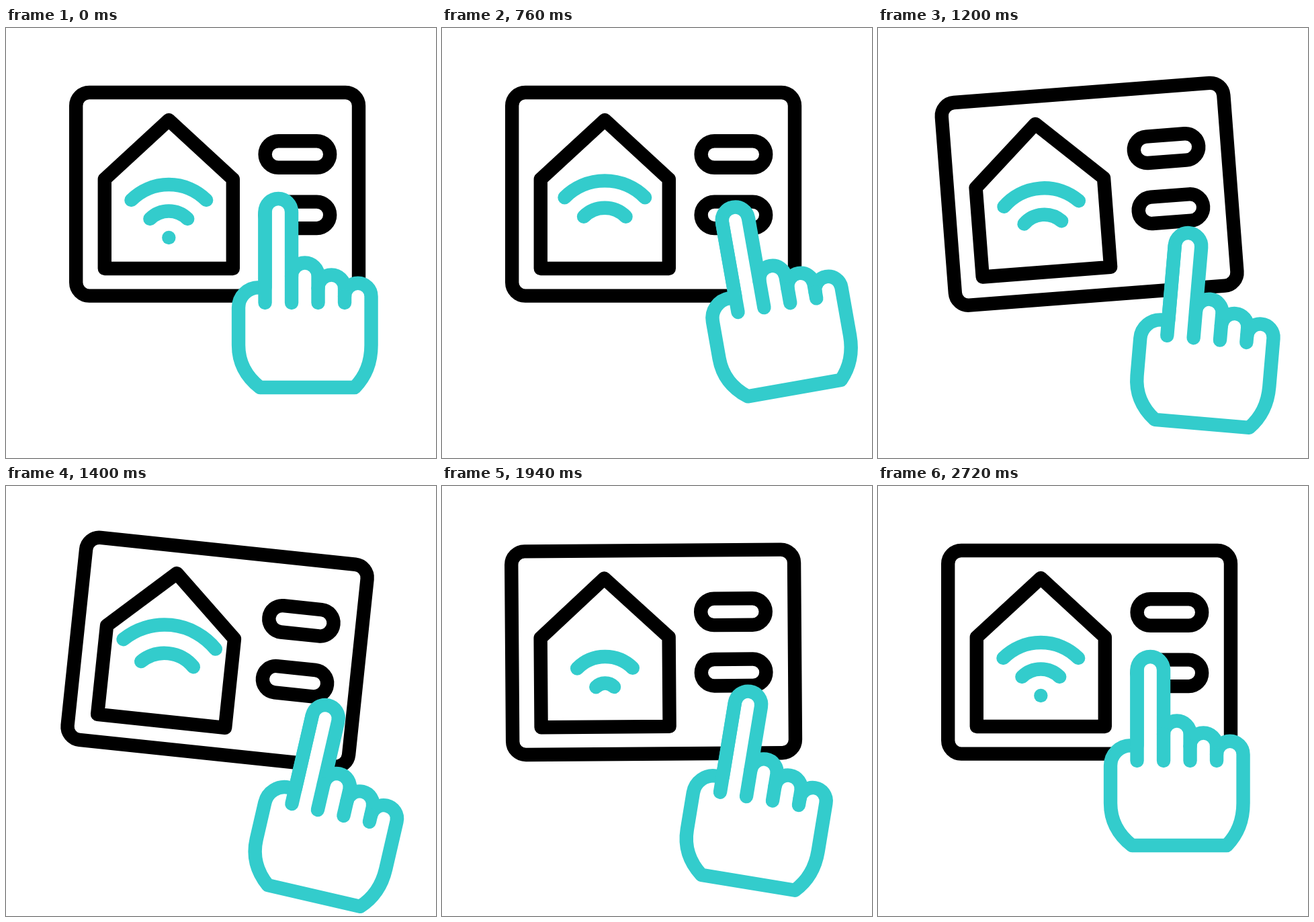
Write an HTML page with a canvas that moves like this. It is 640 px wide and 640 px high and loops after 3 s.

```html
<!DOCTYPE html>
<html lang="en">
<head>
<meta charset="utf-8">
<title>Smart home panel</title>
<style>
  html, body { margin: 0; width: 100%; height: 100%; overflow: hidden; background: #fff; }
  canvas { display: block; width: 100vmin; height: 100vmin; }
</style>
</head>
<body>
<canvas id="stage" width="640" height="640"></canvas>
<script>
const ctx = document.getElementById('stage').getContext('2d');
const BLACK = '#000', CYAN = '#33cccc';
const LOOP = 3000, STEP = 20, LINE = 20.4;
const UNIT = 39.5;          // shared spacing of fingers, waves and button height
const RADIUS = UNIT / 2;
const panel = { x: 104.2, y: 96, w: 420.8, h: 302.6 };
const tip = { x: 405.3, y: 273.7 };
const wifi = { x: 242.3, y: 312, start: 200, end: 2720, period: 500 };

const ease = u => u * u * (3 - 2 * u);
const ramp = (t, from, to) => ease(Math.min(1, Math.max(0, (t - from) / (to - from))));
const centre = r => ({ x: r.x + r.w / 2, y: r.y + r.h / 2 });

function around(p, degrees, scale, draw) {
  ctx.save();
  ctx.translate(p.x, p.y);
  ctx.rotate(degrees * Math.PI / 180);
  ctx.scale(scale, scale);
  ctx.translate(-p.x, -p.y);
  draw();
  ctx.restore();
}

function strokePath(path, color) {
  ctx.strokeStyle = color;
  ctx.stroke(path);
}

function box(r) {
  const path = new Path2D();
  path.roundRect(r.x, r.y, r.w, r.h, RADIUS);
  strokePath(path, BLACK);
}

function buildHouse() {
  const half = 95.5, eaves = 225, floor = 358;
  const path = new Path2D();
  path.moveTo(wifi.x, 137);
  path.lineTo(wifi.x + half, eaves);
  path.lineTo(wifi.x + half, floor);
  path.lineTo(wifi.x - half, floor);
  path.lineTo(wifi.x - half, eaves);
  path.closePath();
  return path;
}

function buildHand() {
  const left = tip.x - RADIUS, thumb = left - UNIT, right = left + 4 * UNIT;
  const thumbTop = 386.3, thumbRadius = 30, wrist = 472, base = 535;
  const outline = new Path2D(), creases = new Path2D();
  outline.moveTo(left, thumbTop);
  [tip.y, 369.3, 387.3, 399.5].forEach((y, i) => {
    const x = left + i * UNIT;
    outline.lineTo(x, y);
    outline.arc(x + RADIUS, y, RADIUS, Math.PI, 0);
    creases.moveTo(x, y);
    creases.lineTo(x, 409);
  });
  outline.lineTo(right, wrist);
  outline.quadraticCurveTo(right, base - 25, 519, base);
  outline.lineTo(378, base);
  outline.quadraticCurveTo(thumb, base - 25, thumb, wrist);
  outline.arcTo(thumb, thumbTop, left, thumbTop, thumbRadius);
  outline.closePath();
  return { outline, creases };
}

const house = buildHouse();
const hand = buildHand();

// The panel rocks left and right, each swing weaker than the last.
function panelTilt(t) {
  const n = (t - 800) / 300, i = Math.floor(n);
  const peak = k => k >= 1 && k <= 3 ? (-1) ** k * (10 - 2 * k) : 0;
  return peak(i) + (peak(i + 1) - peak(i)) * ease(n - i);
}

function drawWifi(t) {
  const moving = t > wifi.start && t < wifi.end;
  const phase = moving ? (t - wifi.start) / wifi.period % 1 : 0;
  const first = phase > 0.42 ? 0 : 1;
  for (let i = first; i < first + 2; i++) {
    const grow = i < 2 ? 1 : 1.18;
    const wave = new Path2D();
    wave.arc(wifi.x, wifi.y, (i + phase * grow) * UNIT, -0.75 * Math.PI, -0.25 * Math.PI);
    strokePath(wave, CYAN);
  }
  if (!moving) {
    ctx.fillStyle = CYAN;
    ctx.beginPath();
    ctx.arc(wifi.x, wifi.y, LINE / 2, 0, 2 * Math.PI);
    ctx.fill();
  }
}

function drawPanel(t, press) {
  const upper = { x: 385.6, y: 168.3, w: 96.6, h: UNIT };
  const lower = { ...upper, y: 258.6 };
  box(panel);
  strokePath(house, BLACK);
  box(upper);
  around(centre(lower), 0, 1 + 0.12 * press, () => box(lower));
  drawWifi(t);
}

function drawHand() {
  ctx.fillStyle = '#fff';
  ctx.fill(hand.outline);
  strokePath(hand.outline, CYAN);
  strokePath(hand.creases, CYAN);
}

function render(t) {
  ctx.fillStyle = '#fff';
  ctx.fillRect(0, 0, 640, 640);
  ctx.lineWidth = LINE;
  ctx.lineCap = ctx.lineJoin = 'round';

  const aim = ramp(t, 200, 500) - ramp(t, 900, 1400);
  const pull = ramp(t, 900, 1400) - ramp(t, 1800, 2200);
  const press = ramp(t, 2200, 2400) - ramp(t, 2400, 2600);

  around(centre(panel), panelTilt(t), 1, () => drawPanel(t, press));
  ctx.save();
  ctx.translate(31.2 * aim + 69.8 * pull, 12.6 * aim + 72 * pull);
  around({ x: 350, y: 245 }, 0, 1 - 0.07 * press,
    () => around(tip, 13 * pull - 10 * aim, 1, drawHand));
  ctx.restore();
}

const begin = performance.now();
function tick() {
  const t = (performance.now() - begin) % LOOP;
  render(Math.floor(t / STEP) * STEP);
  requestAnimationFrame(tick);
}
tick();
</script>
</body>
</html>
```
